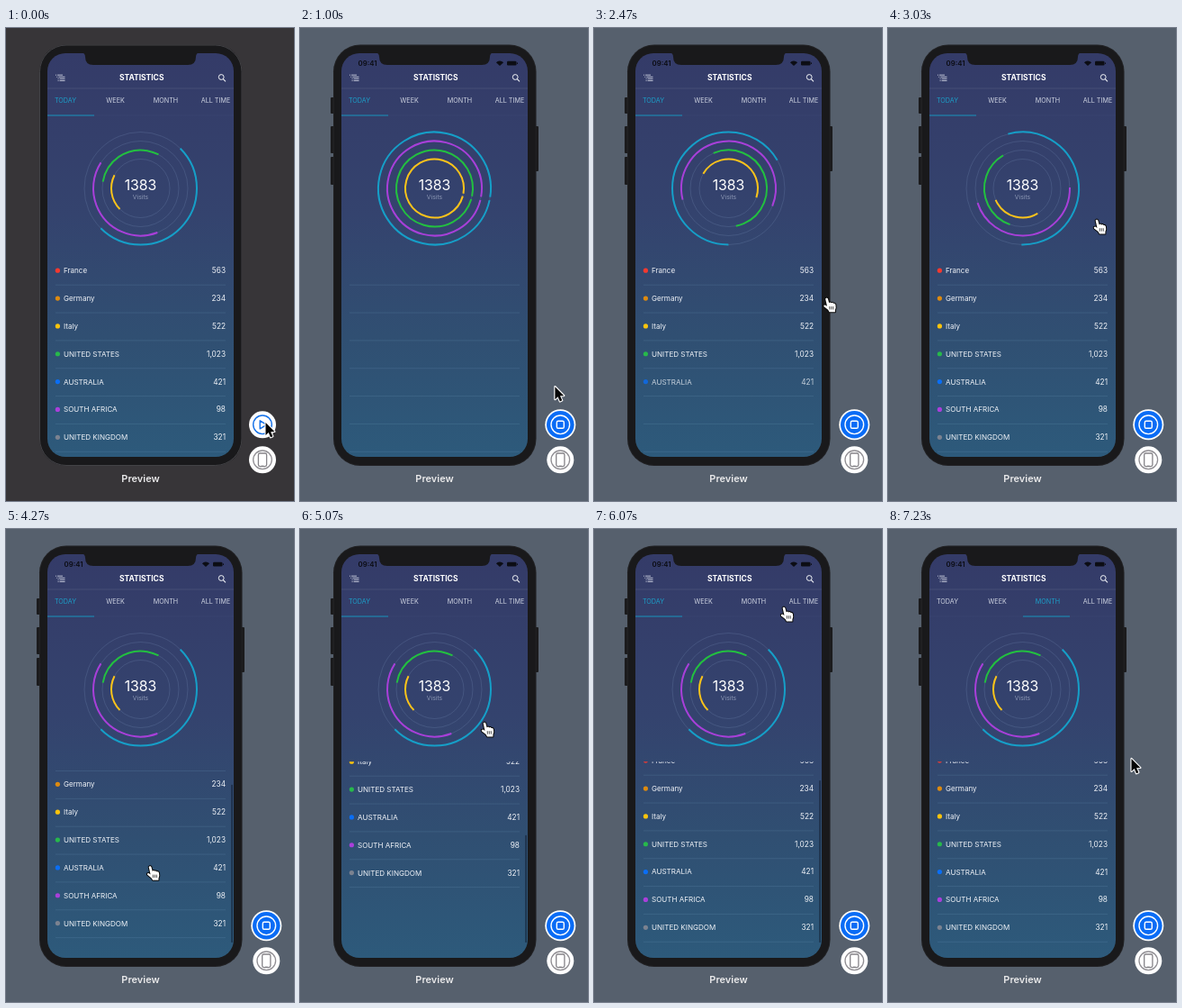
Recreate the animation shown at these times as an HTML page with a canvas. Size 320 by 525 pixels, loop 7.26 s.

```html
<!DOCTYPE html>
<html lang="en">
<head>
<meta charset="utf-8">
<title>Statistics preview</title>
<style>
html, body { margin: 0; width: 100%; height: 100%; overflow: hidden; background: #373538; }
canvas { display: block; width: 320px; height: 525px; }
</style>
</head>
<body>
<canvas id="stage"></canvas>
<script>
const LOOP = 7260, LAUNCH = 755;
const canvas = document.getElementById('stage');
const ctx = canvas.getContext('2d');
const dpr = window.devicePixelRatio || 1;
canvas.width = 320 * dpr;
canvas.height = 525 * dpr;

const CX = 149.5, CY = 178, ROW = 30.85;
const CYAN = '#159fc8';
const ROWS = [
  ['France', '563', '#f5392f'],
  ['Germany', '234', '#dd8a10'],
  ['Italy', '522', '#fcc40c'],
  ['UNITED STATES', '1,023', '#27b84b'],
  ['AUSTRALIA', '421', '#0a6ef5'],
  ['SOUTH AFRICA', '98', '#aa3fdb'],
  ['UNITED KINGDOM', '321', '#7b8290']
];
const TABS = [['TODAY', 66], ['WEEK', 121.5], ['MONTH', 177.5], ['ALL TIME', 233]];
// radius, colour, final sweep, total turn of the leading end
const RINGS = [
  [62.5, CYAN, 180, 495],
  [52.5, '#a83fd9', 144, 573],
  [42.5, '#22c03f', 108, 658],
  [32.5, '#fbc31a', 72, 567]
];
// time, x, y of the pointer tip
const PATH = [
  [0, 288, 437], [400, 288, 437], [1500, 279, 367], [2000, 279, 367],
  [3030, 232, 213], [3750, 154, 396], [4145, 154, 396], [4730, 205, 215],
  [5100, 205, 215], [5770, 213, 92], [6070, 211, 87], [6430, 178, 82],
  [6570, 178, 82], [7230, 270, 254], [LOOP, 270, 254]
];

const clamp = v => Math.max(0, Math.min(1, v));
const ramp = (t, from, to) => clamp((t - from) / (to - from));
const smooth = u => u * u * (3 - 2 * u);
const mix = (a, b, u) => a + (b - a) * u;
const rgb = (a, b, u) => `rgb(${a.map((v, i) => Math.round(mix(v, b[i], u)))})`;

function pointerAt(t) {
  let i = 0;
  while (i < PATH.length - 2 && t >= PATH[i + 1][0]) i++;
  const [t0, x0, y0] = PATH[i], [t1, x1, y1] = PATH[i + 1];
  const u = smooth(ramp(t, t0, t1));
  return [mix(x0, x1, u), mix(y0, y1, u)];
}

function scrollAt(t) {
  if (t < 4145) return t < 0 ? 12 : 0;
  if (t > 5070) {
    const s = (t - 5070) * 0.012;
    return 12 + 60.7 * (1 + s) * Math.exp(-s);
  }
  const drag = 396 - pointerAt(t)[1];
  if (drag < 12) return drag;
  const view = 216;
  return 12 + view * (1 - 1 / ((drag - 12) * 0.5 / view + 1));
}

function text(str, x, y, size, color, weight = 400, align = 'left') {
  ctx.font = `${weight} ${size}px Inter, Roboto, sans-serif`;
  ctx.textAlign = align;
  ctx.fillStyle = color;
  ctx.fillText(str, x, y);
}

function box(x, y, w, h, r) {
  ctx.beginPath();
  ctx.roundRect(x, y, w, h, r);
}

function fillBox(x, y, w, h, r, color) {
  box(x, y, w, h, r);
  ctx.fillStyle = color;
  ctx.fill();
}

function disc(x, y, r, color) {
  ctx.beginPath();
  ctx.arc(x, y, r, 0, Math.PI * 2);
  ctx.fillStyle = color;
  ctx.fill();
}

function arc(x, y, r, from, to, color, width) {
  ctx.beginPath();
  ctx.arc(x, y, r, from * Math.PI / 180, to * Math.PI / 180);
  ctx.strokeStyle = color;
  ctx.lineWidth = width;
  ctx.stroke();
}

function line(color, width, ...pts) {
  ctx.beginPath();
  for (let i = 0; i < pts.length; i += 2) ctx.lineTo(pts[i], pts[i + 1]);
  ctx.strokeStyle = color;
  ctx.lineWidth = width;
  ctx.stroke();
}

function faded(alpha, draw) {
  if (alpha <= 0) return;
  ctx.save();
  ctx.globalAlpha *= alpha;
  draw();
  ctx.restore();
}

function drawBody(live) {
  faded(live, () => {
    for (const [x, y, h] of [[34, 77, 18], [34, 109, 30], [34, 143, 31], [260, 109, 50]])
      fillBox(x, y, 5, h, 1, '#1b1b1d');
  });
  fillBox(37, 18.5, 225.5, 467.5, 30, '#19191b');
  box(37.5, 19, 224.5, 466.5, 29.5);
  ctx.strokeStyle = `rgba(90,90,94,${mix(0.65, 0.15, live)})`;
  ctx.lineWidth = 1;
  ctx.stroke();

  const bg = ctx.createLinearGradient(0, 28, 0, 476);
  bg.addColorStop(0, '#343b68');
  bg.addColorStop(0.4, '#34436e');
  bg.addColorStop(0.7, '#304f72');
  bg.addColorStop(1, '#2d5a7b');
  fillBox(46, 28, 207, 448, 20, bg);
}

function drawNotch() {
  ctx.beginPath();
  ctx.moveTo(84, 27);
  ctx.quadraticCurveTo(88, 28, 88, 32);
  ctx.quadraticCurveTo(88, 41, 97, 41);
  ctx.lineTo(202, 41);
  ctx.quadraticCurveTo(211, 41, 211, 32);
  ctx.quadraticCurveTo(211, 28, 215, 27);
  ctx.fillStyle = '#19191b';
  ctx.fill();
}

function drawStatus() {
  const ink = '#0c0d14';
  text('09:41', 75, 42, 7.8, ink, 600, 'center');
  ctx.beginPath();
  ctx.moveTo(222, 42);
  ctx.arc(222, 42, 5.6, -Math.PI * 0.76, -Math.PI * 0.24);
  ctx.fillStyle = ink;
  ctx.fill();
  fillBox(230, 36.8, 10.5, 4.8, 1.3, ink);
  fillBox(241, 38.3, 1, 1.8, 0.5, ink);
}

function drawHeader(t) {
  for (let i = 0; i < 4; i++) {
    const x = 55 + Math.min(i, 2) * 1.3, y = 52.2 + i * 2.1;
    line('#dfe3ee', 0.8, x, y, x + 1, y);
    line('#dfe3ee', 0.8, x + 2, y, i ? 65.5 : 63, y);
  }
  text('STATISTICS', 150.7, 58.2, 8.5, '#fff', 700, 'center');
  arc(239.2, 54.5, 2.9, 0, 360, '#f2f4f8', 1);
  line('#f2f4f8', 1.1, 241.3, 56.6, 244, 59.3);
  line('rgba(255,255,255,.1)', 0.8, 46, 67, 253, 67);
  line('rgba(255,255,255,.04)', 0.8, 46, 97, 253, 97);

  const u = smooth(ramp(t, 6570, 6850));
  const dim = [205, 210, 224], lit = [28, 158, 200];
  TABS.forEach(([name, x], i) => {
    const on = i === 0 ? 1 - u : i === 2 ? u : 0;
    text(name, x, 83.4, 7.2, rgb(dim, lit, on), 400, 'center');
  });
  const left = mix(46, 150, u);
  line('#1791bb', 1.1, left, 97, left + 52, 97);
}

function drawChart(t) {
  const k = t < LAUNCH ? 1 : (1 - Math.cos(Math.PI * ramp(t, 760, 3573))) / 2;
  for (const [r, color, sweep, turn] of RINGS) {
    arc(CX, CY, r, 0, 360, 'rgba(150,175,215,.2)', 0.9);
    const end = turn * k;
    arc(CX, CY, r, end - mix(360, sweep, k), end, color, 2);
  }
  text('1383', CX, 179.8, 15.8, '#fff', 400, 'center');
  text('Visits', CX, 189.9, 6.8, '#8d98b5', 400, 'center');
}

function drawList(t) {
  const off = scrollAt(t);
  ctx.save();
  ctx.beginPath();
  ctx.rect(46, 258.3, 207, 218);
  ctx.clip();
  ROWS.forEach(([name, count, color], i) => {
    const y = 269.2 + ROW * i - off;
    const shown = t < LAUNCH ? 1 : ramp(t, 1515 + 200 * i, 1715 + 200 * i);
    line('rgba(120,165,200,.2)', 0.9, 55, y + 16, 244, y + 16);
    faded(shown, () => {
      disc(57.4, y, 2.6, color);
      text(name, 64, y + 2.9, 8.05, '#f0f3f8');
      text(count, 244, y + 2.9, 8.3, '#f0f3f8', 400, 'right');
    });
  });
  ctx.restore();
  const bar = ramp(t, 4145, 4230) * (1 - ramp(t, 6130, 6430));
  faded(bar, () => fillBox(250.2, 267 + off, 1.7, 192 - off, 0.9, 'rgba(16,28,46,.6)'));
}

function drawButtons(live) {
  const x = mix(285, 289.3, live);
  disc(x, 440.3, mix(15, 17, live), '#fff');
  faded(1 - live, () => {
    arc(x, 440.3, 10.3, 0, 360, '#126fe8', 1.4);
    ctx.beginPath();
    ctx.moveTo(x - 2.8, 435.8);
    ctx.lineTo(x + 4.6, 440.3);
    ctx.lineTo(x - 2.8, 444.8);
    ctx.closePath();
    ctx.lineJoin = 'round';
    ctx.stroke();
  });
  faded(live, () => {
    disc(x, 440.3, 15.3, '#0a6cf5');
    arc(x, 440.3, 10.3, 0, 360, '#fff', 1.4);
    box(x - 4, 436.3, 8, 8, 1.6);
    ctx.stroke();
  });

  disc(x, 479.3, 15, '#fff');
  arc(x, 479.3, 10.3, 0, 360, '#918f94', 1.3);
  fillBox(x - 4.6, 472, 9.2, 14.6, 1.8, '#fff');
  ctx.strokeStyle = '#858388';
  ctx.stroke();
  line('#858388', 1.2, x - 1.5, 486.2, x + 1.5, 486.2);
}

function outline(pts, x, y, fill, edge, width) {
  ctx.beginPath();
  for (let i = 0; i < pts.length; i += 2) ctx.lineTo(x + pts[i], y + pts[i + 1]);
  ctx.closePath();
  ctx.lineJoin = 'round';
  ctx.lineWidth = width;
  ctx.strokeStyle = edge;
  ctx.stroke();
  ctx.fillStyle = fill;
  ctx.fill();
}

const ARROW = [0.5, 1, 0.5, 15, 3.7, 12, 6, 17.3, 8.4, 16.2, 6.1, 11.2, 10.4, 11];
const HAND = [
  -1.4, 0.6, 0, -0.4, 1.3, 0.5, 2.6, 5.2, 4.2, 4.6, 5.2, 5.4, 6.6, 5, 7.6, 6,
  9, 5.9, 9.9, 7.2, 10.2, 10.6, 9.4, 13.2, 9.4, 15.4, 3, 15.4, 1.6, 13,
  -3, 9.4, -3.2, 8, -1.6, 7.6, 0.5, 9
];

function drawPointer(t) {
  const [x, y] = pointerAt(t);
  if (x > 261) {
    outline(ARROW, x, y, '#050505', '#fff', 2.2);
    return;
  }
  outline(HAND, x, y, '#fff', '#0a0a0a', 2);
  for (const dx of [3.2, 5.2, 7.2])
    line('#222', 0.8, x + dx, y + 9.2, x + dx + 0.2, y + 12.6);
}

function draw(t) {
  const live = smooth(ramp(t, 330, 730));
  ctx.setTransform(dpr, 0, 0, dpr, 0, 0);
  ctx.fillStyle = rgb([55, 53, 56], [86, 96, 109], live);
  ctx.fillRect(0, 0, 320, 525);
  drawBody(live);
  drawNotch();
  faded(live, drawStatus);
  drawHeader(t);
  drawChart(t);
  drawList(t);
  text('Preview', 149.5, 503.8, 11, '#e9e9ea', 600, 'center');
  drawButtons(live);
  drawPointer(t);
}

const start = performance.now();
function tick() {
  draw((performance.now() - start) % LOOP);
  requestAnimationFrame(tick);
}
tick();
</script>
</body>
</html>
```
